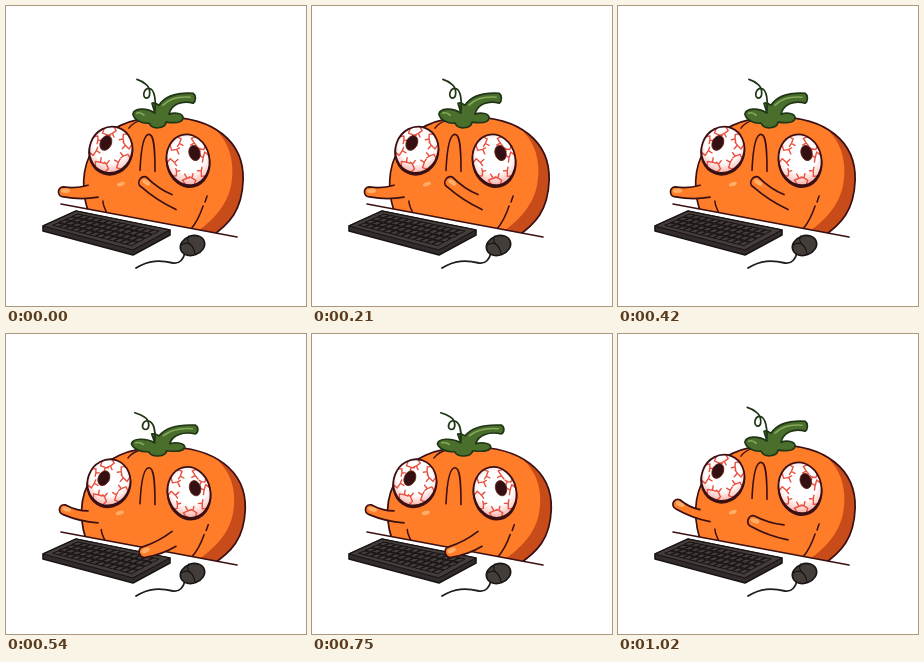
Animation of 300x300 px, one loop 1050 ms. Source, as an HTML page with a canvas:

```html
<!DOCTYPE html>
<html lang="en">
<head>
<meta charset="utf-8">
<title>Typing pumpkin</title>
<style>
html, body { margin: 0; width: 100%; height: 100%; overflow: hidden; background: #fff; }
canvas { display: block; width: 300px; height: 300px; }
</style>
</head>
<body>
<canvas id="stage" width="300" height="300"></canvas>
<script>
const ctx = document.getElementById('stage').getContext('2d');
const INK = '#3b1013', ORANGE = '#ff7c28', SHADE = '#c84c1a', GLOSS = '#ffae68';
const GREEN = '#4a6e2b', LEAF = '#1f3516', BLACK = '#191415', GREY = '#443e3b';
const STEP = 30, STEPS = 7;

const line = d => new Path2D(d);

function oval(x, y, rx, ry, turn = 0) {
  const path = new Path2D();
  path.ellipse(x, y, rx, ry, turn, 0, 2 * Math.PI);
  return path;
}

function paint(path, fill, stroke, width = 1.6) {
  if (fill) { ctx.fillStyle = fill; ctx.fill(path); }
  if (stroke) { ctx.strokeStyle = stroke; ctx.lineWidth = width; ctx.stroke(path); }
}

function layer(draw) {
  ctx.save();
  draw();
  ctx.restore();
}

function scaleAbout(x, y, sx, sy) {
  ctx.translate(x, y);
  ctx.scale(sx, sy);
  ctx.translate(-x, -y);
}

function randomizer(seed) {
  return () => {
    const n = Math.sin(seed++) * 43758.5;
    return n - Math.floor(n);
  };
}

const ABOVE_DESK = line('M0 188L300 244V0H0Z');
const BODY = line('M86 216C62 158 92 111 156 111C208 110 238 136 237 174C236 204 224 218 203 232');
const BODY_SHADE = line('M194 112C218 126 228 146 226 170C225 194 211 212 188 228L205 236L250 200L240 110Z');
const CREASES = line('M123 122C126 118 131 115 136 114M201 190L199 196M197 200C194 209 190 217 185 223M97 195C97 199 99 203 101 207');
const RIB = line('M134 164C135 142 138 128 143 128C148 128 149 141 149 165');
const STEM = line('M149 107L146 97C149 96 151 98 153 99C159 90 170 86 187 87C190 89 190 95 187 97C176 94 165 98 163 108C169 106 177 107 177 112C176 117 167 117 160 116C159 123 146 124 143 117C137 118 128 114 127 108C128 102 140 101 149 107Z');
const STEM_LIGHT = line('M157 99C164 92 173 90 184 91M131 107C134 106 136 107 138 109');
const CURL = line('M149 104C150 95 149 83 143 82C138 82 136 90 140 92C145 92 145 82 140 78C137 75 134 74 131 73');

function drawBody(squash, sway) {
  layer(() => {
    ctx.clip(ABOVE_DESK);
    layer(() => {
      scaleAbout(157, 226, 1 + 0.035 * squash, 1 - 0.022 * squash);
      paint(BODY, ORANGE);
      layer(() => { ctx.clip(BODY); paint(BODY_SHADE, SHADE); });
      paint(BODY, null, INK, 1.7);
      paint(CREASES, null, INK, 1.5);
      paint(oval(115, 178, 4, 2, -0.3), GLOSS);
    });
    ctx.translate(0, 7 * squash);
    paint(RIB, null, INK, 1.6);
  });
  layer(() => {
    scaleAbout(150, 123, 1 + 0.08 * squash, 1 - 0.14 * squash);
    paint(STEM, GREEN, LEAF, 1.7);
    paint(STEM_LIGHT, null, '#86a85b', 1.7);
    ctx.transform(1, 0, -sway / 15, 1, 7 * sway, 0);
    paint(CURL, null, LEAF, 1.7);
  });
}

function drawEye(x, y, rx, ry, turn, gaze, squash, seed) {
  x = 157 + (x - 157) * (1 + 0.05 * squash);
  y += 6 * squash;
  paint(oval(x, y + 1.8, rx, ry, turn), INK, INK, 1.8);
  const glow = ctx.createRadialGradient(x, y - 4, rx * 0.8, x, y - 4, ry + 5);
  glow.addColorStop(0, '#fff');
  glow.addColorStop(1, '#f9aaa2');
  const ball = oval(x, y, rx, ry, turn);
  paint(ball, glow);
  layer(() => {
    ctx.clip(ball);
    ctx.translate(x, y);
    ctx.rotate(turn);
    paint(veins(rx, ry, seed), null, '#e8503f', 1.4);
  });
  paint(ball, null, INK, 1.8);
  paint(oval(x + gaze, y - 7 + 3.5 * squash, 5.6, 7.8, turn * 1.3), '#351012', '#6b2416', 0.8);
}

// Crooked lines growing inward from the rim, each with a short branch.
function veins(rx, ry, seed) {
  const path = new Path2D(), random = randomizer(seed), count = 10;
  for (let i = 0; i < count; i++) {
    const base = (i + 0.5 * random()) / count * 2 * Math.PI;
    const bend = (i % 2 ? 1 : -1) * (0.1 + 0.1 * random());
    const reach = 0.12 + 0.06 * random();
    const at = (k, turn) => {
      const a = base + bend * turn, r = 1 - k * reach;
      return [Math.cos(a) * rx * r, Math.sin(a) * ry * r];
    };
    path.moveTo(...at(0, 0));
    path.lineTo(...at(1, 1));
    path.lineTo(...at(2, -0.3));
    path.lineTo(...at(3, 0.8));
    path.moveTo(...at(2, -0.3));
    path.lineTo(...at(2.3, -1.6));
  }
  return path;
}

// An arm swings its tip up and down around rest height; its root follows a little.
function drawArm(upper, lower, tipX, restY, reach, swing, width) {
  const [x1, y1] = upper, [x2, y2] = lower, lift = 4.5 * swing;
  const tx = tipX + 5 * swing * swing, ty = restY + reach * swing;
  const angle = Math.atan2(ty - (y1 + y2) / 2 - lift, tx - (x1 + x2) / 2);
  const c = Math.cos(angle), s = Math.sin(angle);
  const fromTip = (along, side) => [tx + c * along - s * side, ty + s * along + c * side];
  const bow = (x, y, [px, py]) => [(x + px) / 2 + s * 3, (y + py) / 2 - c * 3];
  const top = fromTip(-5, width), bottom = fromTip(-5, -width);
  const arm = new Path2D();
  arm.moveTo(x1, y1 + lift);
  arm.quadraticCurveTo(...bow(x1, y1 + lift, top), ...top);
  arm.bezierCurveTo(...fromTip(1.7, width), ...fromTip(1.7, -width), ...bottom);
  arm.quadraticCurveTo(...bow(x2, y2 + lift, bottom), x2, y2 + lift);
  paint(arm, ORANGE, INK, 1.7);
  paint(oval(...fromTip(-7, 1), 4.5, 2.2, angle), GLOSS);
}

// Point on the keyboard's top face.
function onBoard(u, v) {
  const mix = (a, b, c, d) => (a * (1 - u) + b * u) * (1 - v) + (c * (1 - u) + d * u) * v;
  return [mix(70, 164, 37, 127), mix(205, 224, 220, 244)];
}

function boardQuad(u0, v0, u1, v1) {
  const path = new Path2D();
  [[u0, v0], [u1, v0], [u1, v1], [u0, v1]].forEach(p => path.lineTo(...onBoard(...p)));
  path.closePath();
  return path;
}

function drawDesk() {
  paint(line('M55 198L231 231'), null, INK, 1.6);
  paint(line('M37 220L70 205L164 224V229L127 249L37 225Z'), '#322c2a', BLACK, 1.6);
  paint(boardQuad(0, 0, 1, 1), GREY, BLACK, 1.2);
  const rows = 4, cols = 13;
  for (let row = 0; row < rows; row++) {
    for (let col = 0; col < cols; col++) {
      const u = 0.06 + 0.88 * col / cols, v = 0.12 + 0.78 * row / rows;
      paint(boardQuad(u, v, u + 0.058, v + 0.16), GREY, BLACK, 1);
    }
  }
  paint(line('M179 247C177 254 174 258 167 257C154 254 143 254 130 262'), null, '#211b1c', 1.8);
  paint(oval(186.5, 239.5, 12.5, 9.7, -0.35), GREY, BLACK, 1.6);
  paint(line('M175 239C181 235 187 237 189 248M183 237C181 234 181 232 183 230'), null, BLACK, 1.2);
}

function draw() {
  const step = Math.floor(performance.now() / STEP) % STEPS;
  const wave = peak => Math.cos(2 * Math.PI * (step - peak) / STEPS);
  const squash = (1 + wave(3)) / 2, sway = wave(1.75);
  ctx.fillStyle = '#fff';
  ctx.fillRect(0, 0, 300, 300);
  drawBody(squash, sway);
  drawEye(105, 143.5, 21.3, 23.3, 0.35, -5, squash, 3);
  drawEye(182, 153.5, 21.3, 25.6, -0.22, 6.5 + sway, squash, 40);
  drawDesk();
  drawArm([82, 179], [92, 191], 52.5, 185, 22, wave(1.7), 5);
  drawArm([166, 193], [170, 208], 129, 197, 24, wave(3.7), 5.5);
  requestAnimationFrame(draw);
}

ctx.lineCap = ctx.lineJoin = 'round';
draw();
</script>
</body>
</html>
```
